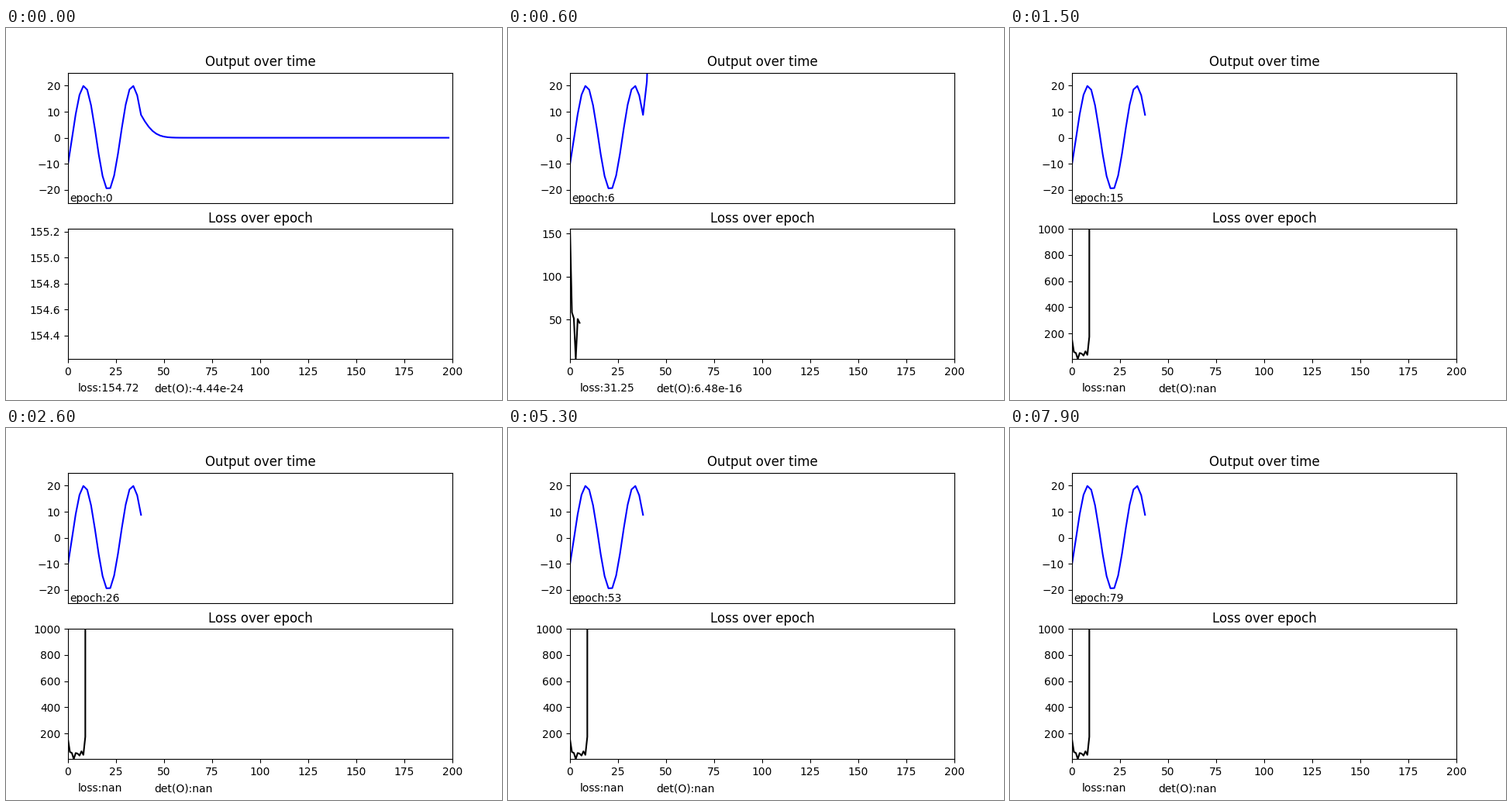
Recreate the animation shown at these times as a matplotlib script. Size 640 by 480 pixels, loop 8000 ms.

```python
import matplotlib.pyplot as plt
import numpy as np
from matplotlib.animation import FuncAnimation

EPOCHS = 80
WARMUP = 20  # samples of the driving signal before the free run
LOSS = [154.72, 58.31, 51.46, 4.72, 50.73, 46.18, 31.25, 63.54, 36.42,
        174.28, 81426.37]
DET = [-4.44e-24, 2.17e-22, -3.86e-20, 5.02e-19, 1.33e-17, -2.71e-16,
       6.48e-16, -1.95e-15, 4.37e-15, -1.02e-14, 3.56e-10]

t = np.arange(0, 200, 2)
signal = 20 * np.sin(0.25 * t - 0.53)


def output(epoch):
    """Driven signal followed by the free-running response."""
    y = signal.copy()
    last = y[WARMUP - 1]
    n = np.arange(1, len(t) - WARMUP + 1)
    if epoch == 0:
        tail = last * np.exp(-0.3 * n - 0.035 * n**2)
    elif epoch < len(LOSS):
        growth = 2 * 200 ** ((epoch - 4) / 5)
        tail = last - 3.8 * n + growth * n**2
    else:
        tail = np.nan
    y[WARMUP:] = tail
    return y


def value(seq, i):
    return seq[i] if i < len(seq) else np.nan


fig, (top, low) = plt.subplots(2, 1, figsize=(6.4, 4.8), dpi=100)
top.set(title="Output over time", xlim=(0, 200), ylim=(-25, 25), xticks=[])
low.set(title="Loss over epoch", xlim=(0, 200))

out_line, = top.plot([], [], "b")
loss_line, = low.plot([], [], "k")
epoch_text = top.text(0.005, 0.01, "", transform=top.transAxes)
loss_text = low.text(0.025, -0.25, "", transform=low.transAxes)
det_text = low.text(0.225, -0.25, "", transform=low.transAxes)


def update(epoch):
    out_line.set_data(t, output(epoch))
    past = LOSS[:max(epoch, 1)]
    loss_line.set_data(range(len(past)), past)
    loss_line.set_visible(epoch > 1)
    low.set_ylim(min(past) - 0.5, min(max(past) + 0.5, 1000))
    epoch_text.set_text(f"epoch:{epoch}")
    loss_text.set_text(f"loss:{value(LOSS, epoch):.2f}")
    det_text.set_text(f"det(O):{value(DET, epoch):.2e}")
    return out_line, loss_line, epoch_text, loss_text, det_text


anim = FuncAnimation(fig, update, frames=EPOCHS, interval=100,
                     repeat=True, repeat_delay=0)
plt.show()
```
